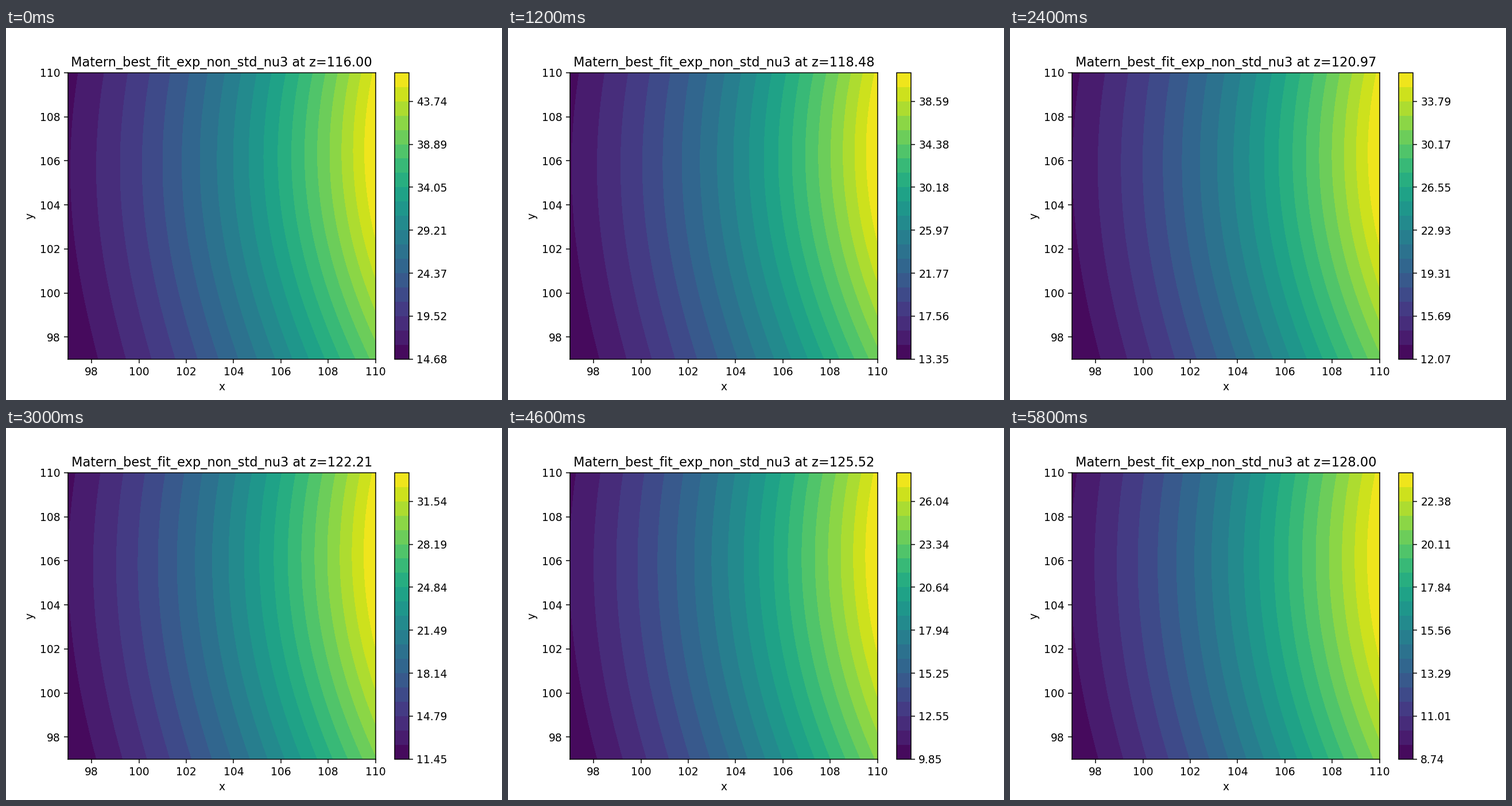
A matplotlib script for the animation above (6000 ms loop, 864 by 648 pixels).

```python
import numpy as np
import matplotlib.pyplot as plt
from matplotlib.animation import FuncAnimation

FRAMES = 30
Z_START, Z_END = 116, 128
BANDS = 20

# Value range of each slice, as smooth curves through a few knots in z
KNOTS = np.array([0, 3, 10, 15, 18, 23, 29]) / (FRAMES - 1)
LOW = np.polyfit(KNOTS, [14.68, 14.0125, 12.49, 11.446, 10.838, 9.85, 8.738], 6)
TICK_STEP = np.polyfit(KNOTS, [4.8427, 4.5183, 3.81, 3.3488, 3.092, 2.698, 2.2745], 6)

axis = np.linspace(97, 110, 120)
X, Y = np.meshgrid(axis, axis)


def mix(a, b, t):
    return a + (b - a) * t


def log_drop(t):
    """Fall of the log field from its peak on the right edge, scaled to 0..1."""
    u = X - 110
    w = (X - 97) / 13
    s0 = 0.0752 - 0.0144 * t + 0.0011 * t**2
    s1 = mix(-0.0015, -0.00187, t)
    s2 = mix(-0.000049, -0.00006, t)
    along = -(s0 * u + s1 * u**2 / 2 + s2 * u**3 / 3)

    ridge = mix(mix(105.6, 105.8, t), mix(106.5, 106.2, t), w)
    bend = mix(mix(0.00153, 0.0012, t), mix(0.00222, 0.00152, t), w)
    d2 = (Y - ridge) ** 2
    across = bend * d2 - mix(3.3e-6, 1e-6, t) * d2**2

    drop = along + across
    drop -= drop.min()
    return drop / drop.max()


fig = plt.figure(figsize=(6.4, 4.8), dpi=135)


def draw(n):
    t = n / (FRAMES - 1)
    low = np.polyval(LOW, t)
    high = low + np.polyval(TICK_STEP, t) * BANDS / 3
    levels = np.linspace(low, high, BANDS + 1)
    field = np.clip(high * (low / high) ** log_drop(t), low, high)

    fig.clear()
    ax = fig.add_subplot()
    filled = ax.contourf(X, Y, field, levels=levels, cmap="viridis")
    fig.colorbar(filled, ax=ax, ticks=levels[::3], format="%.2f")
    ax.set_xlabel("x")
    ax.set_ylabel("y")
    z = mix(Z_START, Z_END, t)
    ax.set_title(f"Matern_best_fit_exp_non_std_nu3 at z={z:.2f}")
    return []


anim = FuncAnimation(fig, draw, frames=FRAMES, init_func=lambda: [],
                     interval=200, repeat=True, repeat_delay=0)
plt.show()
```
